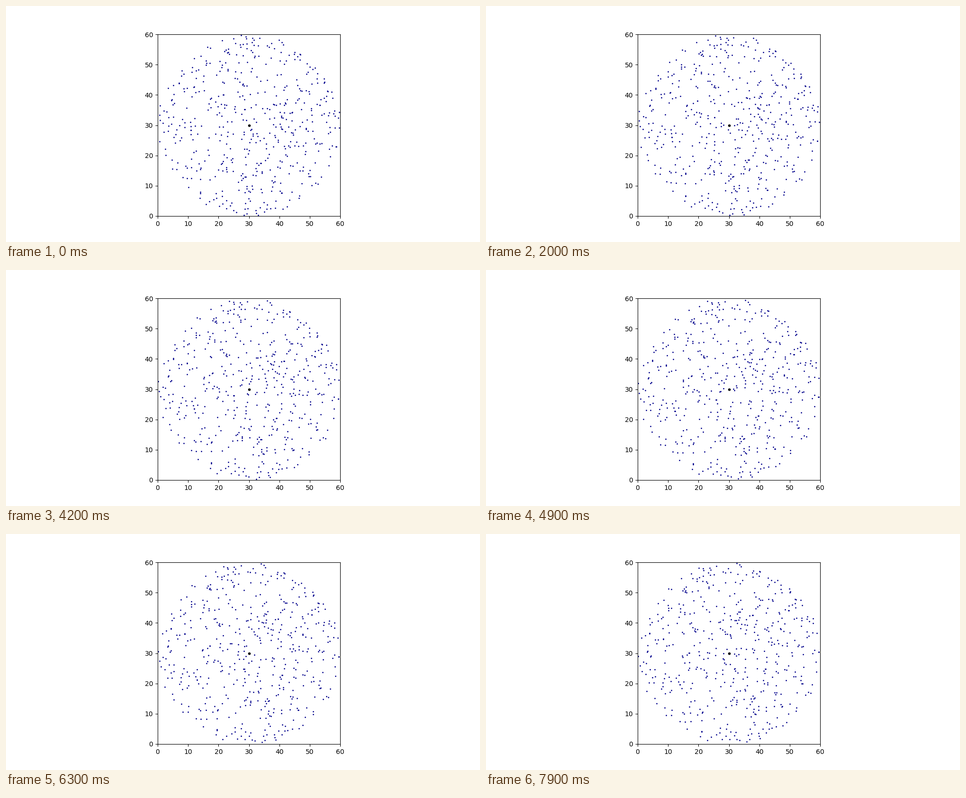
Write a matplotlib script that moves like this. It is 1000x500 px and loops after 8 s.

```python
import numpy as np
import matplotlib.pyplot as plt
from matplotlib.animation import FuncAnimation

FRAMES, INTERVAL = 80, 100
SIZE, COUNT = 60, 500
CENTRE = SIZE / 2
K = 0.52        # Keplerian rate: omega = K / r**1.5 per frame

# Stars spread evenly over the disc, leaving the central body free
rng = np.random.default_rng(12)
radius = np.sqrt(rng.uniform(0.8, CENTRE ** 2, COUNT))
start = rng.uniform(0, 2 * np.pi, COUNT)
omega = K / radius ** 1.5

fig, ax = plt.subplots(figsize=(10, 5), dpi=100)
ax.set_aspect("equal")
ax.set(xlim=(0, SIZE), ylim=(0, SIZE),
       xticks=range(0, SIZE + 1, 10), yticks=range(0, SIZE + 1, 10))
stars, = ax.plot([], [], "o", color="darkblue", markersize=1)
ax.plot(CENTRE, CENTRE, "o", color="black", markersize=3)


def update(i):
    angle = start + omega * i
    stars.set_data(CENTRE + radius * np.cos(angle),
                   CENTRE + radius * np.sin(angle))
    return stars,


anim = FuncAnimation(fig, update, frames=FRAMES, interval=INTERVAL,
                     repeat=True, repeat_delay=0)
plt.show()
```
